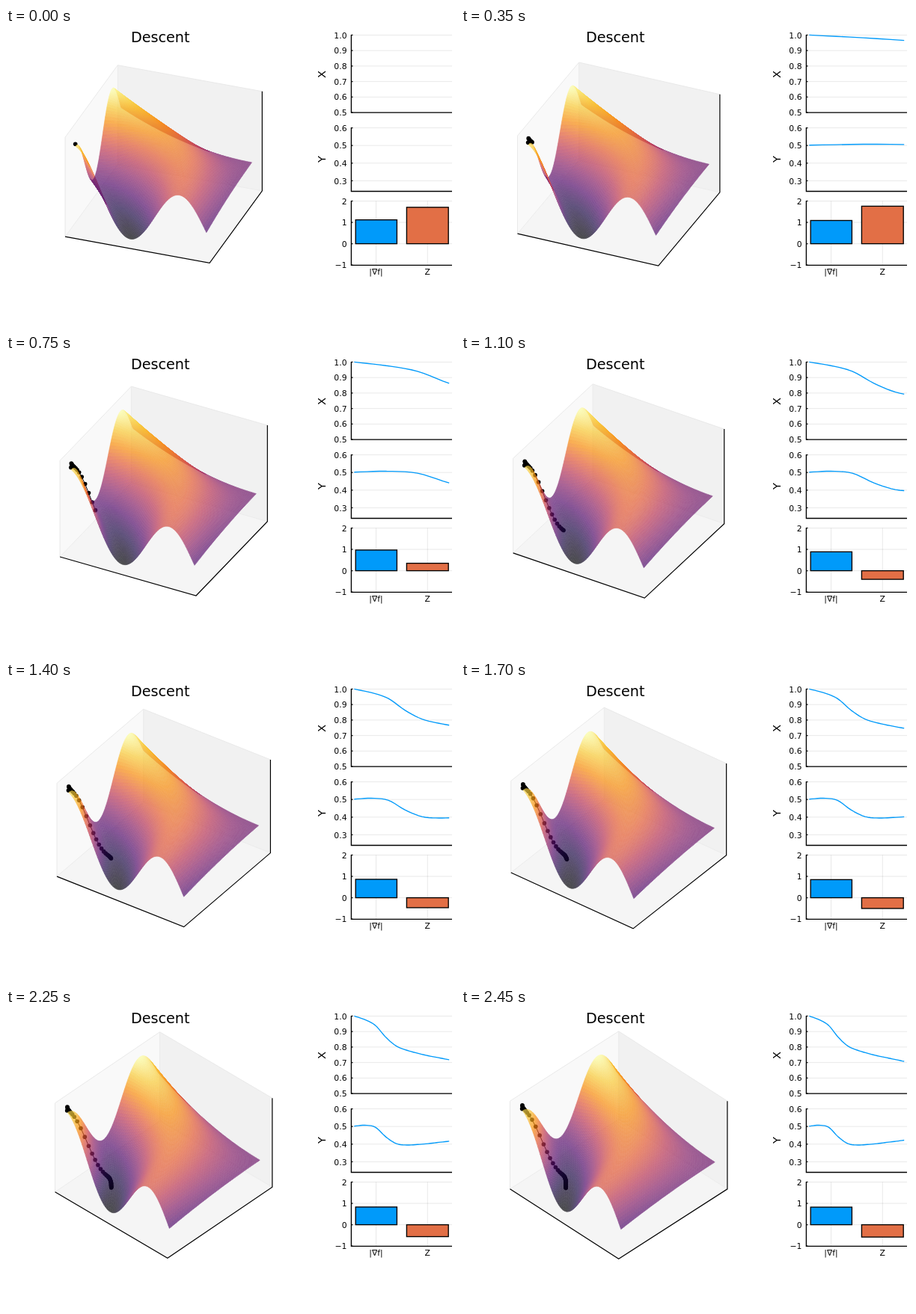
Animation of 600 by 400 pixels, one loop 2500 ms. Source, as an HTML page with a canvas:

```html
<!DOCTYPE html>
<html lang="en">
<head>
<meta charset="utf-8">
<title>Descent</title>
<style>
html, body { margin: 0; width: 100%; height: 100%; overflow: hidden; background: #fff; }
canvas, svg { position: absolute; left: 0; top: 0; width: 600px; height: 400px; }
text { font: 10.8px "DejaVu Sans", sans-serif; fill: #000; }
.title { font-size: 19.2px; }
.label { font-size: 14.7px; }
.grid { stroke: #000; stroke-opacity: .09; stroke-width: 1; }
.axis { stroke: #000; stroke-width: 1.35; fill: none; }
.curve { stroke: #009afa; stroke-width: 1.35; fill: none; stroke-linejoin: round; }
.bar { stroke: #000; stroke-width: 1.35; }
</style>
</head>
<body>
<canvas id="scene" width="600" height="400"></canvas>
<svg id="plots" viewBox="0 0 600 400">
  <text class="title" x="206.2" y="19.3" text-anchor="middle">Descent</text>
</svg>
<script>
const STEPS = 50, STEP_MS = 50, N = 84, ALPHA = 0.7;
const F_MIN = -0.9, F_MAX = 1.99;
const svg = document.getElementById('plots');
const ctx = document.getElementById('scene').getContext('2d');
const layerCanvas = document.createElement('canvas');
layerCanvas.width = 600;
layerCanvas.height = 400;
const layer = layerCanvas.getContext('2d');

const f = (x, y) => x * x - y * y + Math.sin(5 * Math.PI * x * y);

// Inferno colour map
const stops = [[0, 0, 4], [31, 12, 72], [85, 15, 109], [136, 34, 106], [186, 54, 85],
  [227, 89, 51], [249, 140, 10], [249, 201, 50], [252, 255, 164]];
function inferno(t) {
  const s = Math.max(0, Math.min(0.9999, t)) * 8, k = Math.floor(s), u = s - k;
  return `rgb(${stops[k].map((c, j) => Math.round(c + (stops[k + 1][j] - c) * u))})`;
}

// Path of the descent: smooth curve through a knot every five steps
function spline(knots, i) {
  const s = i / 5, k = Math.floor(s), u = s - k;
  const last = knots.length - 1;
  const b = knots[k], c = knots[Math.min(k + 1, last)];
  const a = k ? knots[k - 1] : 2 * b - c, d = knots[Math.min(k + 2, last)];
  return b + u / 2 * (c - a + u * (2 * a - 5 * b + 4 * c - d + u * (3 * (b - c) + d - a)));
}
const xKnots = [1, .977, .94, .863, .806, .779, .76, .744, .731, .718, .706];
const yKnots = [.502, .507, .496, .441, .403, .395, .398, .403, .41, .4165, .4235];
const path = Array.from({ length: STEPS }, (_, i) => {
  const x = spline(xKnots, i), y = spline(yKnots, i);
  return { x, y, z: f(x, y) + (i ? 0.1 : -0.04) };
});

// Box coordinates in [-1, 1]
const boxX = x => 0.906 * (1 - 2 * x);
const boxY = y => 0.864 * (1 - 4 * y);

const mesh = [], cells = [];
for (let r = 0; r <= N; r++) {
  for (let c = 0; c <= N; c++) {
    const x = 1 - c / N, y = r / N / 2;
    mesh.push([boxX(x), boxY(y), 0.627 * f(x, y) - 0.355]);
  }
}
for (let r = 0; r < N; r++) {
  for (let c = 0; c < N; c++) {
    const z = f(1 - (c + 0.5) / N, (r + 0.5) / N / 2);
    cells.push({ k: r * (N + 1) + c, color: inferno((z - F_MIN) / (F_MAX - F_MIN)) });
  }
}

function camera(i) {
  const rad = Math.PI / 180, u = i / (STEPS - 1);
  const az = (20 + 25 * u) * rad, el = (30 + 10 * u) * rad;
  const ca = Math.cos(az), sa = Math.sin(az), ce = Math.cos(el), se = Math.sin(el);
  return ([x, y, z]) => [
    210.7 + 102.7 * (x * ca + y * sa),
    182 + 102.7 * se * (x * sa - y * ca) - 76.8 * ce * z
  ];
}

function trace(c, pts) {
  c.beginPath();
  pts.forEach(([x, y], k) => k ? c.lineTo(x, y) : c.moveTo(x, y));
}

function drawBox(project) {
  const p = (...v) => project(v);
  const face = (color, ...pts) => { trace(ctx, pts); ctx.closePath(); ctx.fillStyle = color; ctx.fill(); };
  const line = (color, ...pts) => { trace(ctx, pts); ctx.strokeStyle = color; ctx.stroke(); };
  const left = p(-1, -1, -1), front = p(1, -1, -1), right = p(1, 1, -1), back = p(-1, 1, -1);
  const leftTop = p(-1, -1, 1), rightTop = p(1, 1, 1), backTop = p(-1, 1, 1);
  face('#f5f5f5', left, front, right, back);
  face('#f9f9f9', left, back, backTop, leftTop);
  face('#f1f1f1', back, right, rightTop, backTop);
  ctx.lineWidth = 1;
  line('#e9e9e9', left, leftTop, backTop, rightTop);
  line('#ebebeb', left, back, right);
  line('#ebebeb', back, backTop);
  ctx.lineWidth = 1.2;
  line('#000', left, front, right, rightTop);
}

function drawTrail(project, i) {
  const pts = path.slice(0, i + 1).map(p => project([boxX(p.x), boxY(p.y), 0.7 * p.z - 0.4]));
  ctx.strokeStyle = ctx.fillStyle = '#000';
  ctx.lineWidth = 1;
  trace(ctx, pts);
  ctx.stroke();
  for (const [x, y] of pts) {
    ctx.beginPath();
    ctx.arc(x, y, 2.8, 0, 7);
    ctx.fill();
  }
}

// Sides facing away and towards the viewer are separate translucent layers
function drawSurface(project) {
  const pts = mesh.map(project);
  const sides = [[], []];
  for (const { k, color } of cells) {
    const quad = [pts[k], pts[k + 1], pts[k + N + 2], pts[k + N + 1]];
    const [a, b, c, d] = quad;
    const area = (c[0] - a[0]) * (d[1] - b[1]) - (c[1] - a[1]) * (d[0] - b[0]);
    sides[area > 0 ? 1 : 0].push([quad, color]);
  }
  layer.lineWidth = 0.6;
  ctx.globalAlpha = ALPHA;
  for (const side of sides) {
    layer.clearRect(0, 0, 600, 400);
    for (const [quad, color] of side) {
      trace(layer, quad);
      layer.closePath();
      layer.fillStyle = layer.strokeStyle = color;
      layer.fill();
      layer.stroke();
    }
    ctx.drawImage(layerCanvas, 0, 0);
  }
  ctx.globalAlpha = 1;
}

// Panels on the right
function add(tag, attrs, text) {
  const el = document.createElementNS('http://www.w3.org/2000/svg', tag);
  for (const key in attrs) el.setAttribute(key, attrs[key]);
  if (text) el.textContent = text;
  return svg.appendChild(el);
}
const LEFT = 461.4, RIGHT = 596;

function panel(top, bottom, ticks, toY, digits) {
  for (const v of ticks) {
    const y = toY(v);
    add('path', { class: 'grid', d: `M${LEFT} ${y}H${RIGHT}` });
    add('path', { class: 'axis', d: `M${LEFT} ${y}h2` });
    add('text', { x: 455.5, y: y + 4.1, 'text-anchor': 'end' }, v.toFixed(digits).replace('-', '−'));
  }
  add('path', { class: 'axis', d: `M${LEFT} ${top}V${bottom}H${RIGHT}` });
}
function sideLabel(text, y) {
  add('text', { class: 'label', 'text-anchor': 'middle', transform: `translate(427.3 ${y}) rotate(-90)` }, text);
}

const xToY = v => 9.45 + (1 - v) * 207.2;
const yToY = v => 133.6 + (0.6 - v) * 236;
const barToY = v => 288.6 - v * 28.55;

panel(9, 113.05, [1, .9, .8, .7, .6, .5], xToY, 1);
sideLabel('X', 61.9);
panel(133, 218.5, [.6, .5, .4, .3], yToY, 1);
sideLabel('Y', 175.5);
for (const [x, name] of [[494.5, '|∇f|'], [563.3, 'Z']]) {
  add('path', { class: 'grid', d: `M${x} 231.5V317.4` });
  add('text', { x, y: 330.3, 'text-anchor': 'middle' }, name);
}
panel(231, 317.4, [2, 1, 0, -1], barToY, 0);

const xCurve = add('path', { class: 'curve' });
const yCurve = add('path', { class: 'curve' });
const normBar = add('rect', { class: 'bar', x: 467.2, width: 55.2, fill: '#009afa' });
const zBar = add('rect', { class: 'bar', x: 535.4, width: 55.8, fill: '#e26f46' });

function setCurve(el, i, key, toY) {
  const pts = path.slice(0, i + 1).map((p, k) => `${465.3 + 126.9 * k / i} ${toY(p[key])}`);
  el.setAttribute('d', i ? 'M' + pts.join('L') : '');
}
function setBar(el, v) {
  el.setAttribute('y', barToY(Math.max(v, 0)));
  el.setAttribute('height', Math.abs(v) * 28.55);
}

function draw(i) {
  const project = camera(i), { x, y, z } = path[i];
  ctx.clearRect(0, 0, 600, 400);
  drawBox(project);
  drawTrail(project, i);
  drawSurface(project);
  setCurve(xCurve, i, 'x', xToY);
  setCurve(yCurve, i, 'y', yToY);
  setBar(normBar, Math.hypot(x, y));
  setBar(zBar, z);
}

let shown = -1;
const start = performance.now();
function tick() {
  const i = Math.floor((performance.now() - start) / STEP_MS) % STEPS;
  if (i !== shown) draw(shown = i);
  requestAnimationFrame(tick);
}
tick();
</script>
</body>
</html>
```
